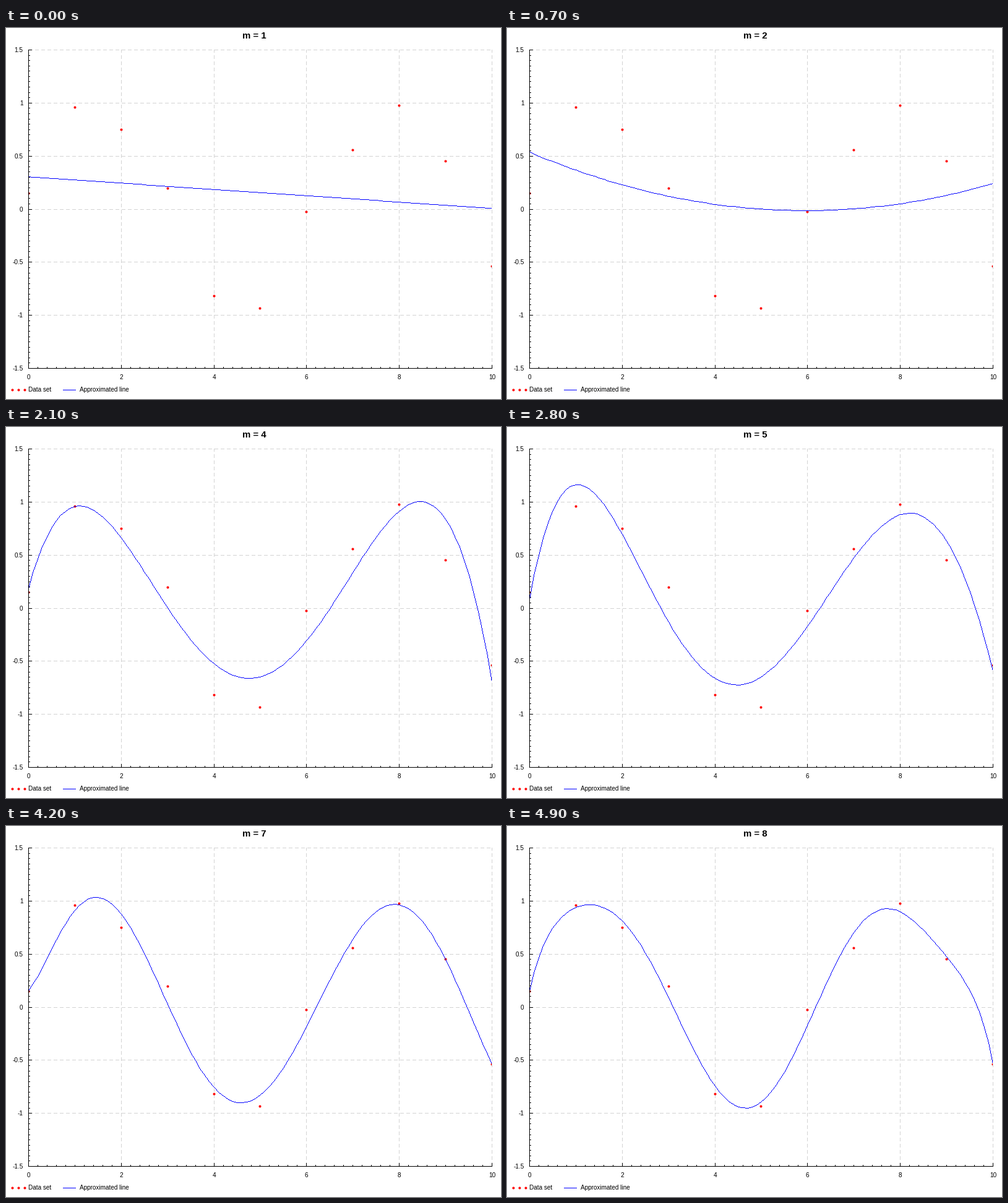
A matplotlib script that plays this animation: 800x600 px, repeating every 5.6 s.

```python
import numpy as np
import matplotlib.pyplot as plt
from matplotlib.animation import FuncAnimation
from matplotlib.collections import LineCollection
from matplotlib.patches import Circle, Rectangle

plt.rcParams["toolbar"] = "None"
plt.rcParams["font.family"] = "Liberation Sans"

W, H, DPI = 800, 600, 100
PX = 72 / DPI  # one pixel in points
LEFT, RIGHT, TOP, BOTTOM = 36, 785, 35, 550
GRID = "#d3d3d3"

xs = np.arange(11)
ys = np.array([0.1485, 0.958, 0.7485, 0.195, -0.8184, -0.935,
               -0.026, 0.556, 0.9757, 0.4514, -0.5388])

fig = plt.figure(figsize=(W / DPI, H / DPI), dpi=DPI, facecolor="white")
ax = fig.add_axes([0, 0, 1, 1])
ax.set_xlim(0, W)
ax.set_ylim(H, 0)
ax.axis("off")


def px(x):
    return np.ceil(LEFT + np.asarray(x) * (RIGHT - LEFT) / 10 - 0.5).astype(int)


def py(y):
    return np.floor(TOP + (1.5 - np.asarray(y)) * (BOTTOM - TOP) / 3 + 0.5).astype(int)


def rule(x0, y0, x1, y1, color="black", style="-", z=1):
    ax.plot([x0, x1], [y0, y1], color=color, lw=PX, ls=style, zorder=z,
            snap=False, solid_capstyle="butt", dash_capstyle="butt")


def hrule(x0, x1, y, **kw):
    rule(x0, y + 0.5, x1, y + 0.5, **kw)


def vrule(x, y0, y1, **kw):
    rule(x + 0.5, y0, x + 0.5, y1, **kw)


def label(x, y, s, size=10, **kw):
    return ax.text(x, y, s, fontsize=size * PX, va="baseline", **kw)


def dot(x, y, clip=None):
    c = ax.add_patch(Circle((x + 0.5, y + 0.5), 2, fc="red", ec="none", zorder=3))
    if clip is not None:
        c.set_clip_path(clip)


def pixel_runs(x, y):
    """One-pixel segments of an aliased polyline through whole-pixel points."""
    cells = set()
    for x0, y0, x1, y1 in zip(x[:-1], y[:-1], x[1:], y[1:]):
        n = max(abs(x1 - x0), abs(y1 - y0)) + 1
        cx = np.floor(np.linspace(x0, x1, n) + 0.5).astype(int)
        cy = np.floor(np.linspace(y0, y1, n) + 0.5).astype(int)
        cells.update(zip(cx.tolist(), cy.tolist()))
    return [((a, b + 0.5), (a + 1, b + 0.5)) for a, b in sorted(cells)]


# Grid and major ticks
dashed = dict(color=GRID, style=(0, (6, 4)))
for v in np.arange(-1.5, 1.6, 0.5):
    row = int(py(v))
    if v > -1.5:
        hrule(LEFT + 1, RIGHT + 1, row, **dashed)
    hrule(LEFT, LEFT + 6, row, z=5)
    label(27.5, row + 4, f"{v:g}", ha="right")
for v in range(0, 11, 2):
    col = int(px(v))
    if v > 0:
        vrule(col, BOTTOM, TOP, **dashed)
    vrule(col, BOTTOM - 5, BOTTOM, z=5)
    label(col + 0.5, 568, str(v), ha="center")

# Minor ticks and axes
for v in np.linspace(-1.5, 1.5, 61):
    hrule(LEFT, LEFT + 3, int(py(v)), z=5)
for v in np.linspace(0, 10, 51):
    vrule(int(px(v)), BOTTOM - 2, BOTTOM, z=5)
vrule(LEFT, TOP, BOTTOM + 1, z=5)
hrule(LEFT, RIGHT + 1, BOTTOM, z=5)

# Data points
area = ax.add_patch(Rectangle((LEFT + 1, TOP), RIGHT - LEFT - 1, BOTTOM - TOP,
                              fc="none", ec="none"))
for x, y in zip(px(xs), py(ys)):
    dot(x, y, area)

# Legend
for x in (10, 20, 30):
    dot(x, 585)
label(36.5, 588, "Data set")
hrule(92, 113, 585, color="blue")
label(119, 588, "Approximated line")

title = label(401, 17, "", size=15, weight="bold", ha="center")
curve = LineCollection([], colors="blue", linewidths=PX, zorder=4,
                       capstyle="butt", snap=False)
ax.add_collection(curve, autolim=False)
curve.set_clip_path(area)

grid_x = np.linspace(0, 10, 101)


def draw(i):
    degree = i + 1
    fit = np.polynomial.Polynomial.fit(xs, ys, degree)
    curve.set_segments(pixel_runs(px(grid_x), py(fit(grid_x))))
    title.set_text(f"m = {degree}")
    return curve, title


anim = FuncAnimation(fig, draw, frames=8, interval=700, repeat=True,
                     repeat_delay=0, blit=False)
plt.show()
```
